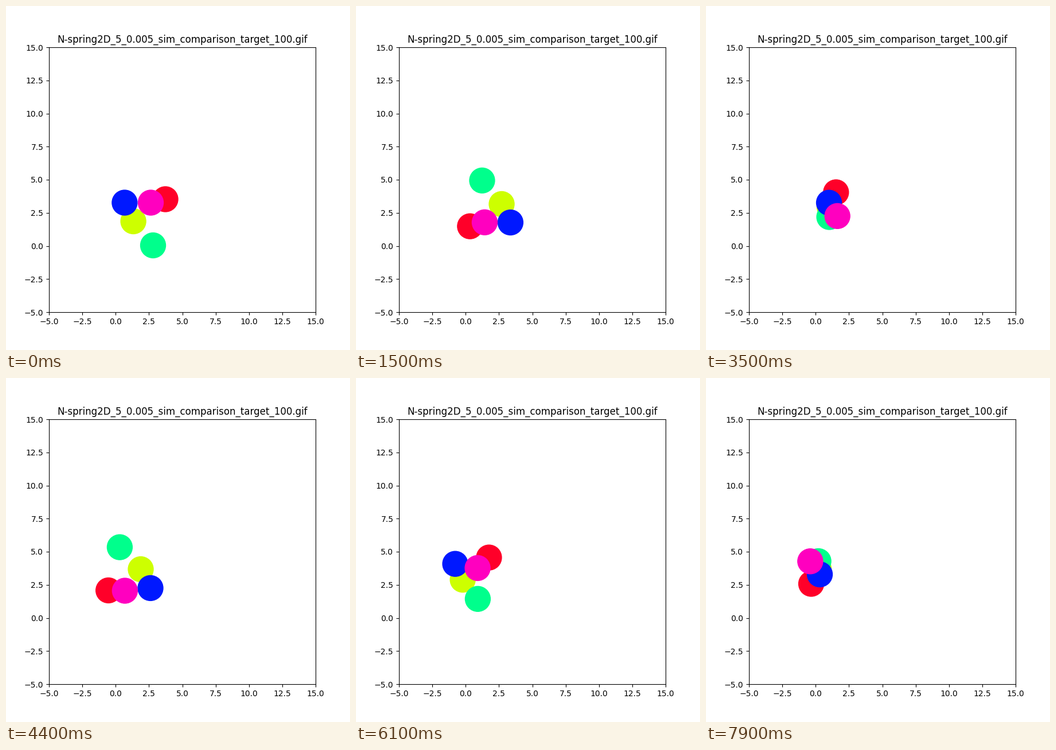
A matplotlib script that plays this animation: 600 by 600 pixels, repeating every 8000 ms.

```python
import numpy as np
import matplotlib.pyplot as plt
from matplotlib.animation import FuncAnimation

FRAMES, INTERVAL = 80, 100
OMEGA = 0.2145            # swing of the springs, radians per frame
CENTRE = 243.2 + 363.2j   # centre of mass in stage pixels, x + iy
DRIFT = -0.657 - 0.361j   # its steady velocity, pixels per frame

# Each ball swings around the centre of mass as A cos(wt) + B sin(wt);
# A and B move slowly from their first to their last value.
A = {
    "red": (34.8 - 26.2j, 36.4 - 20.2j),
    "green": (13.3 + 54.3j, 18.3 + 50.5j),
    "blue": (-36.3 - 20.2j, -39.0 - 18.2j),
    "pink": (9.3 - 20.2j, 4.8 - 27.2j),
}
B = {
    "red": (-7.0 - 18.7j, -4.3 - 18.7j),
    "green": (-10.8 + 0.4j, -11.4 - 1.5j),
    "blue": (8.8 + 0.0j, 5.8 - 2.0j),
    "pink": (5.7 + 25.2j, 8.4 + 25.2j),
}


def swing(ball, t):
    u, phase = t / FRAMES, OMEGA * t
    a, b = ((1 - u) * first + u * last
            for first, last in (A[ball], B[ball]))
    return a * np.cos(phase) + b * np.sin(phase)


def positions(t):
    """Data coordinates of all balls, back to front."""
    red, green, blue, pink = (swing(ball, t) for ball in A)
    yellow = -(red + green + blue + pink)   # equal masses balance out
    z = CENTRE + DRIFT * t + np.array([red, yellow, green, blue, pink])
    return np.column_stack([(z.real - 75) / 23.25 - 5,
                            (534 - z.imag) / 23.1 - 5])


fig, ax = plt.subplots(figsize=(6, 6), dpi=100)
ax.set(xlim=(-5, 15), ylim=(-5, 15))
ax.set_title("N-spring2D_5_0.005_sim_comparison_target_100.gif")
balls = ax.scatter(*positions(0).T, s=1000,
                   c=plt.cm.gist_rainbow(np.linspace(0, 1, 5)))


def update(frame):
    balls.set_offsets(positions(frame))
    return balls,


anim = FuncAnimation(fig, update, frames=FRAMES, interval=INTERVAL,
                     repeat=True, repeat_delay=0)
plt.show()
```
